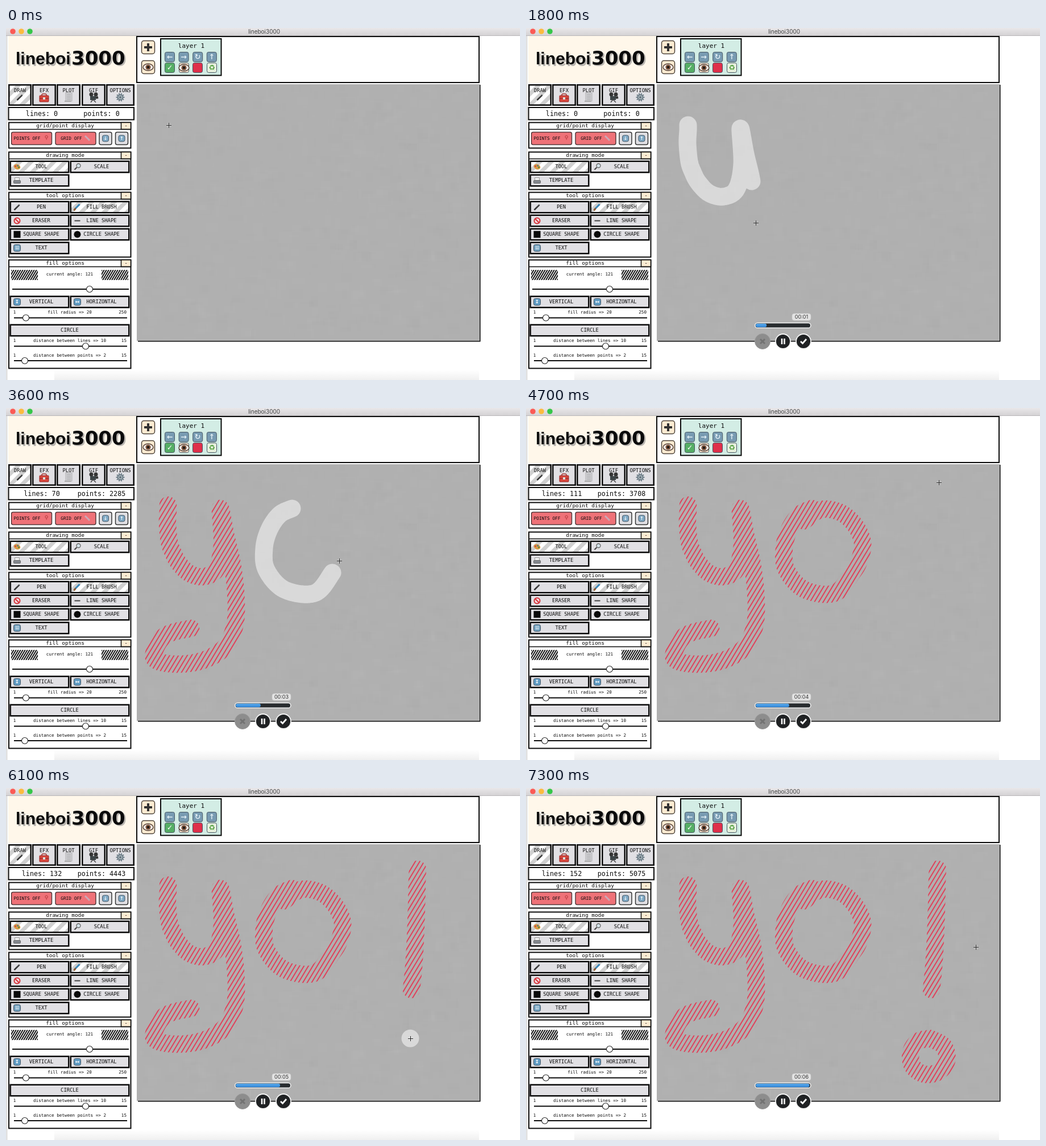
Animation, 904 px wide and 620 px high, one loop 7400 ms. Source, as an HTML page with a canvas:

```html
<!DOCTYPE html>
<html lang="en">
<head>
<meta charset="utf-8">
<title>lineboi3000</title>
<style>
  html, body { margin: 0; width: 100%; height: 100%; overflow: hidden; background: #fff; }
  canvas { display: block; }
</style>
</head>
<body>
<canvas id="stage" width="904" height="620"></canvas>
<script>
const W = 904, H = 620, LOOP = 7400, STEP = 100, LAG = 100;
const MONO = '"DejaVu Sans Mono", monospace', SANS = 'Inter, sans-serif', SYMBOLS = '"DejaVu Sans", sans-serif';
const RED = '#e13f58', BLACK = '#0b0b0b', BUTTON = '#e1e0e4', CREAM = '#fdecd3';

// Pointer gestures: points are evenly spaced in time; those with a total leave a filled stroke.
const gestures = [
  { start: 800, step: 75, lines: 70, total: 2285, points: [
    [285, 171], [285, 180], [284, 203], [287, 235], [293, 253], [303, 272], [322, 291],
    [347, 297], [370, 284], [380, 240], [377, 177], [386, 222], [397, 270], [404, 325],
    [403, 380], [385, 421], [345, 445], [295, 451], [260, 440], [278, 402], [325, 388]] },
  { start: 2800, step: 100, lines: 111, total: 3708, points: [
    [503, 177], [481, 188], [463, 214], [454, 247], [458, 285], [490, 320], [543, 326],
    [574, 290], [586, 269], [592, 238], [579, 207], [553, 184], [518, 179], [489, 199]] },
  { start: 4600, step: 100, points: [[726, 131], [726, 131]] },
  { start: 4800, step: 120, lines: 132, total: 4443, points: [
    [724, 143], [723, 165], [722, 210], [720, 265], [717, 315], [713, 355]] },
  { start: 6100, step: 100, lines: 152, total: 5075, points: [
    [711, 441], [690, 446], [677, 465], [680, 490], [700, 504], [725, 500], [740, 480],
    [735, 455], [715, 443]] },
  { start: 7300, step: 100, points: [[791, 280]] }
];
for (const g of gestures) g.end = g.start + g.step * (g.points.length - 1);

const stage = document.getElementById('stage').getContext('2d');
let c = stage;

function layer(draw) {
  const canvas = document.createElement('canvas');
  canvas.width = W;
  canvas.height = H;
  const previous = c;
  c = canvas.getContext('2d');
  draw();
  c = previous;
  return canvas;
}

function rect(x, y, w, h, fill, border, width = 2, radius = 0) {
  c.beginPath();
  c.roundRect(x, y, w, h, radius);
  if (fill) { c.fillStyle = fill; c.fill(); }
  if (border) { c.strokeStyle = border; c.lineWidth = width; c.stroke(); }
}

function disc(x, y, r, fill, border, width = 1) {
  rect(x - r, y - r, 2 * r, 2 * r, fill, border, width, r);
}

function line(color, width, ...p) {
  c.beginPath();
  for (let i = 0; i < p.length; i += 2) c.lineTo(p[i], p[i + 1]);
  c.strokeStyle = color;
  c.lineWidth = width;
  c.stroke();
}

function text(s, x, y, size, { font = MONO, color = BLACK, align = 'center', weight = '' } = {}) {
  c.font = `${weight} ${size}px ${font}`;
  c.textAlign = align;
  c.textBaseline = 'middle';
  c.fillStyle = color;
  c.fillText(s, x, y);
}

function stripes(x, y, w, h, gap, width, color, slope) {
  c.save();
  c.beginPath();
  c.rect(x, y, w, h);
  c.clip();
  for (let i = x - h; i < x + w + h; i += gap) line(color, width, i, y + h, i + h * slope, y);
  c.restore();
}

function badge(x, y, size, color, glyph, ink = '#fff') {
  rect(x - size / 2, y - size / 2, size, size, color, '#465663', 1, 3);
  text(glyph, x, y + 0.5, size * 0.75, { font: SYMBOLS, color: ink, weight: 'bold' });
}

const icons = {
  pen(x, y) { line('#333', 2.5, x - 5, y + 5, x + 4, y - 4); line('#888', 1, x - 3, y + 1, x + 4, y - 5); },
  brush(x, y) { line('#3a87b8', 3, x - 4, y + 3, x + 4, y - 5); line('#8a5a35', 3, x - 6, y + 6, x - 3, y + 2); },
  toolbox(x, y) {
    rect(x - 4, y - 6, 8, 5, null, '#a5322d', 1.5, 2);
    rect(x - 8, y - 3, 16, 11, '#d8473d', '#922', 1, 1);
    line('#7d2522', 1, x - 8, y + 2, x + 8, y + 2);
    rect(x - 2, y, 4, 4, '#ddd');
  },
  paper(x, y) {
    rect(x - 5, y - 8, 11, 15, '#d0d0d3', '#b0b0b3', 1);
    for (let i = -5; i < 6; i += 3) line('#a4a4a8', 1, x - 3, y + i, x + 4, y + i);
    line('#aaa', 2, x - 7, y + 7, x + 4, y + 7);
  },
  camera(x, y) {
    disc(x - 4, y - 5, 3.5, '#333'); disc(x + 4, y - 5, 3.5, '#333');
    rect(x - 6, y - 2, 10, 7, '#3d4548');
    line('#333', 4, x + 4, y + 1, x + 8, y);
    line('#444', 1.5, x - 5, y + 9, x - 1, y + 4, x + 4, y + 9);
  },
  gear(x, y) {
    for (let a = 0; a < Math.PI; a += Math.PI / 5) {
      const dx = 7.5 * Math.cos(a), dy = 7.5 * Math.sin(a);
      line('#6f7f89', 2, x - dx, y - dy, x + dx, y + dy);
    }
    disc(x, y, 4.5, '#a9b5bc', '#6f7f89', 2);
    disc(x, y, 1.8, '#5b6971');
  },
  palette(x, y) {
    c.beginPath(); c.ellipse(x, y, 6, 4.5, 0.4, 0, 7); c.fillStyle = '#d99a45'; c.fill();
    disc(x - 3, y - 1, 1.3, '#c33'); disc(x + 1, y - 2, 1.3, '#37a'); disc(x + 3, y + 1, 1.3, '#384');
  },
  lens(x, y) { line('#444', 2, x - 5, y + 5, x - 1, y + 1); disc(x + 2, y - 2, 3.5, '#d5e4ea', '#666', 1.3); },
  machine(x, y) { rect(x - 4, y - 5, 8, 5, '#eee', '#999', 1); rect(x - 6, y, 12, 5, '#858990', '#666', 1, 1); },
  ban(x, y) { disc(x, y, 5, '#f0dede', '#d5333a', 2); line('#d5333a', 2, x - 3.5, y - 3.5, x + 3.5, y + 3.5); },
  dash(x, y) { line('#444', 2, x - 5, y, x + 5, y); },
  square(x, y) { rect(x - 6, y - 6, 12, 12, BLACK); },
  circle(x, y) { disc(x, y, 6, BLACK); },
  grid(x, y) { badge(x, y, 12, '#6d9cba', '⊞', '#dcebf4'); },
  vertical(x, y) { badge(x, y, 12, '#5f9bc4', '↕'); },
  horizontal(x, y) { badge(x, y, 12, '#5f9bc4', '↔'); },
  eye(x, y) {
    c.beginPath(); c.ellipse(x, y, 9, 6, 0, 0, 7);
    c.fillStyle = '#f4eee9'; c.fill();
    c.strokeStyle = '#594438'; c.lineWidth = 1.5; c.stroke();
    disc(x, y, 4.5, '#795039'); disc(x, y, 2, '#111');
  }
};

function button(x, y, w, h, label, icon, active) {
  rect(x, y, w, h, active ? '#fff' : BUTTON);
  if (active) stripes(x, y, w, h, 20, 7, '#cfcfcf', 1);
  rect(x + 1.25, y + 1.25, w - 2.5, h - 2.5, null, BLACK, 2.5);
  if (icon) icons[icon](x + 13, y + h / 2);
  text(label, x + w / 2 + (w < 150 ? 3 : 0), y + h / 2, 8.8);
}

function tab(x, w, label, icon, active) {
  button(x, 99, w, 38, '', null, active);
  text(label, x + w / 2, 110.5, 8.8);
  icons[icon](x + w / 2, 122);
}

function panel(y, bottom, title) {
  rect(5, y, 214.5, bottom - y, '#fff', BLACK, 2);
  rect(202.5, y, 17, 12, CREAM, BLACK, 1.5);
  line(BLACK, 1.5, 4, y + 12, 220, y + 12);
  text(title, 104, y + 6, 9.4);
  text('-', 211, y + 6, 9.4);
}

function slider(from, to, y, knob) {
  line(BLACK, 1.8, from, y, to, y);
  disc(knob, y, 5.5, '#fff', '#222', 1.2);
}

function range(y, label, max, knob) {
  text('1', 15, y, 7.6);
  text(label, 112, y, 7.6);
  text(max, 212, y, 7.6, { align: 'right' });
  slider(14, 213, y + 9, knob);
}

function drawLogo(color, offset) {
  const y = 56 + offset;
  text('lineboi', 17 + offset, y, 30, { font: '"Liberation Sans", sans-serif', color, align: 'left', weight: 'bold' });
  text('3000', 115 + offset, y, 34, { font: SYMBOLS, color, align: 'left', weight: 'bold' });
}

function drawHeader() {
  const bar = c.createLinearGradient(0, 0, 0, 14);
  bar.addColorStop(0, '#e9e7e9');
  bar.addColorStop(1, '#d3d1d3');
  rect(0, 0, W, 13.5, bar);
  line('#b9b7b9', 1, 0, 13.5, W, 13.5);
  ['#fb5a55', '#fbbb3e', '#35c649'].forEach((color, i) => disc(12 + 15 * i, 6, 4.8, color));
  text('lineboi3000', 454, 6.5, 10, { font: SANS, color: '#444' });

  rect(4, 14, 225, 83, '#fff7ea');
  drawLogo('#b9b5b0', 2.5);
  drawLogo(BLACK, 0);

  rect(230, 15, 602, 81, '#fff', BLACK, 2);
  rect(238.5, 22.5, 23, 23, CREAM, '#4b4238', 1.5, 4);
  line('#333', 4, 243, 34, 257, 34);
  line('#333', 4, 250, 27, 250, 41);
  rect(238.5, 57.5, 23, 23, CREAM, '#4b4238', 1.5, 4);
  icons.eye(250, 69);

  rect(272, 19, 106.5, 64.5, '#d3ede5', BLACK, 2);
  text('layer 1', 326, 32, 11);
  ['←', '→', '↻', '↑'].forEach((glyph, i) => badge(288 + 24.6 * i, 51, 17, '#789bb2', glyph, '#e2eef5'));
  badge(288, 70, 17, '#55ae65', '✓');
  badge(313, 70, 17, '#f3dfcb', '');
  icons.eye(313, 70);
  badge(337, 70, 17, '#df304b', '');
  badge(362, 70, 17, '#e5efdc', '♻', '#4d9c38');
}

function drawSidebar() {
  line('#bbb', 1, 1.5, 14, 1.5, H);
  tab(4, 41, 'DRAW', 'pen', true);
  tab(46, 42, 'EFX', 'toolbox');
  tab(89, 42, 'PLOT', 'paper');
  tab(133, 42, 'GIF', 'camera');
  tab(176, 50, 'OPTIONS', 'gear');
  rect(4.5, 140, 220.5, 21.5, '#fff', BLACK, 2);

  panel(166.5, 211.5, 'grid/point display');
  rect(9.5, 183.5, 71, 22, '#ef7278', '#553a3c', 1.5, 3);
  text('POINTS OFF', 37, 194.5, 7.8);
  text('⚲', 71, 194, 9, { font: SYMBOLS, color: '#a33' });
  rect(87, 183.5, 71, 22, '#ef7278', '#553a3c', 1.5, 3);
  text('GRID OFF', 115, 194.5, 7.8);
  line('#c9a9b8', 3, 139, 190, 147, 198);
  [[175, '↓'], [203.5, '↑']].forEach(([x, glyph]) => {
    rect(x - 11, 183.5, 22, 22, BUTTON, '#333', 1.5, 3);
    badge(x, 194.5, 11, '#7fa9c5', glyph);
  });

  panel(218.5, 284.5, 'drawing mode');
  panel(289.5, 403.5, 'tool options');
  panel(408.5, 599.5, 'fill options');
  [
    [0, 244, 'TOOL', 'palette', true], [1, 244, 'SCALE', 'lens'],
    [0, 268, 'TEMPLATE', 'machine'],
    [0, 315, 'PEN', 'pen'], [1, 315, 'FILL BRUSH', 'brush', true],
    [0, 339, 'ERASER', 'ban'], [1, 339, 'LINE SHAPE', 'dash'],
    [0, 363, 'SQUARE SHAPE', 'square'], [1, 363, 'CIRCLE SHAPE', 'circle'],
    [0, 387, 'TEXT', 'grid'],
    [0, 482, 'VERTICAL', 'vertical'], [1, 482, 'HORIZONTAL', 'horizontal']
  ].forEach(([column, middle, ...rest]) => button(6.5 + 106 * column, middle - 10.5, 105, 22, ...rest));

  for (const x of [9, 168]) {
    rect(x, 426, 47, 18, '#fff');
    stripes(x, 426, 47, 18, 4, 2, '#151515', 0.6);
  }
  text('current angle: 121', 112, 434.5, 7.6);
  slider(11, 216, 460, 147);
  range(501.5, 'fill radius => 20', '250', 35);
  button(6.5, 521.5, 211, 22, 'CIRCLE');
  range(551.5, 'distance between lines => 10', '15', 140);
  range(577, 'distance between points => 2', '15', 33);
}

function drawPaper() {
  rect(232, 100, 602.5, 452.5, BLACK);
  rect(230, 99, 603, 452, '#b0b0b0');
  let seed = 7;
  const random = () => (seed = seed * 16807 % 2147483647) / 2147483647;
  for (let i = 0; i < 700; i++) {
    const w = 2 + random() * 24, h = 2 + random() * 18;
    const x = 231 + random() * (601 - w), y = 99 + random() * (451 - h);
    rect(x, y, w, h, random() < 0.5 ? 'rgba(255,255,255,.014)' : 'rgba(0,0,0,.009)');
  }
}

const backdrop = layer(() => {
  rect(0, 0, W, H, '#fff');
  const shade = c.createLinearGradient(0, 602, 0, H);
  shade.addColorStop(0, 'rgba(0,0,0,0)');
  shade.addColorStop(1, 'rgba(0,0,0,.06)');
  rect(85, 602, 747, 18, shade);
  drawHeader();
  drawSidebar();
  drawPaper();
});

// Catmull-Rom position along a gesture.
function along({ points, start, step }, t) {
  const last = points.length - 1;
  const u = Math.min(last, Math.max(0, (t - start) / step));
  const i = Math.floor(u), f = u - i;
  const at = n => points[Math.min(last, Math.max(0, n))];
  const [a, b, d, e] = [at(i - 1), at(i), at(i + 1), at(i + 2)];
  return [0, 1].map(k => b[k] + 0.5 * f * (d[k] - a[k] +
    f * (2 * a[k] - 5 * b[k] + 4 * d[k] - e[k] + f * (3 * (b[k] - d[k]) + e[k] - a[k]))));
}

function pointer(t) {
  const next = gestures.findIndex(g => g.start > t);
  if (next === 0) return [286, 171];
  const current = gestures[next < 0 ? gestures.length - 1 : next - 1];
  if (next < 0 || t <= current.end) return along(current, t);
  const target = gestures[next], f = (t - current.end) / (target.start - current.end);
  const from = along(current, t);
  return from.map((v, k) => v + (target.points[0][k] - v) * f);
}

function trail(g, until, color, width) {
  const path = [...g.points[0], ...g.points[0]];
  for (let t = g.start; t <= Math.min(until, g.end); t += 5) path.push(...along(g, t));
  c.lineCap = c.lineJoin = 'round';
  line(color, width, ...path);
  c.lineCap = 'butt';
  c.lineJoin = 'miter';
}

// Parallel lines at the fill angle, kept only where the brush went.
for (const g of gestures.filter(g => g.lines)) {
  g.hatch = layer(() => {
    trail(g, g.end, '#000', 30.5);
    c.globalCompositeOperation = 'source-in';
    const rise = 460, run = rise / Math.tan(59 * Math.PI / 180), gap = 7.75;
    c.beginPath();
    for (let x = -47.25; x < 840; x += gap) {
      c.moveTo(x, 555);
      c.lineTo(x + run, 555 - rise);
    }
    c.strokeStyle = RED;
    c.lineWidth = 1.9;
    c.stroke();
  });
}

function drawRecorder(t) {
  const elapsed = Math.max(0, t - 400);
  rect(468, 503, 33, 12, '#e3e3e3', '#cfcfcf', 0.6, 4);
  text('00:0' + Math.floor(elapsed / 1000), 484.5, 509.5, 9, { font: SANS, color: '#333' });
  rect(402.8, 519.5, 98, 8.8, '#292d30', '#f5f5f5', 1.5, 4.4);
  const blue = c.createLinearGradient(0, 520, 0, 528);
  blue.addColorStop(0, '#61b2f5');
  blue.addColorStop(1, '#2c7fd0');
  rect(404, 520.8, Math.min(95, elapsed * 0.0137), 6.2, blue, null, 0, 3);
  disc(416, 552, 13.5, '#8d8d8d', '#999', 1);
  line('#737373', 3, 412, 548, 420, 556);
  line('#737373', 3, 420, 548, 412, 556);
  for (const x of [452, 488]) disc(x, 552, 13, '#202224', '#f4f4f4', 1.8);
  line('#fff', 2.6, 450, 547, 450, 557);
  line('#fff', 2.6, 454.5, 547, 454.5, 557);
  line('#fff', 2.8, 483, 552, 486.5, 555.5, 493, 548);
}

function drawCursor([x, y]) {
  x = Math.floor(x) + 0.5;
  y = Math.floor(y) + 0.5;
  for (const [color, width] of [['rgba(255,255,255,.45)', 2.4], ['#222', 1]]) {
    line(color, width, x - 4.5, y, x + 4.5, y);
    line(color, width, x, y - 4.5, x, y + 4.5);
  }
}

function render(t) {
  c.drawImage(backdrop, 0, 0);
  let lines = 0, total = 0;
  for (const g of gestures) {
    if (!g.hatch || t < g.start) continue;
    if (t >= g.end + LAG) {
      c.drawImage(g.hatch, 0, 0);
      ({ lines, total } = g);
    } else {
      trail(g, t - LAG, 'rgba(255,255,255,.52)', 31);
    }
  }
  text('lines: ' + lines, 63, 151.5, 11.7);
  text('points: ' + total, 168, 151.5, 11.7);
  if (t >= 300) drawRecorder(t);
  drawCursor(pointer(t));
}

const began = performance.now();
function tick() {
  const t = (performance.now() - began) % LOOP;
  render(Math.floor(t / STEP) * STEP);
  requestAnimationFrame(tick);
}
tick();
</script>
</body>
</html>
```
